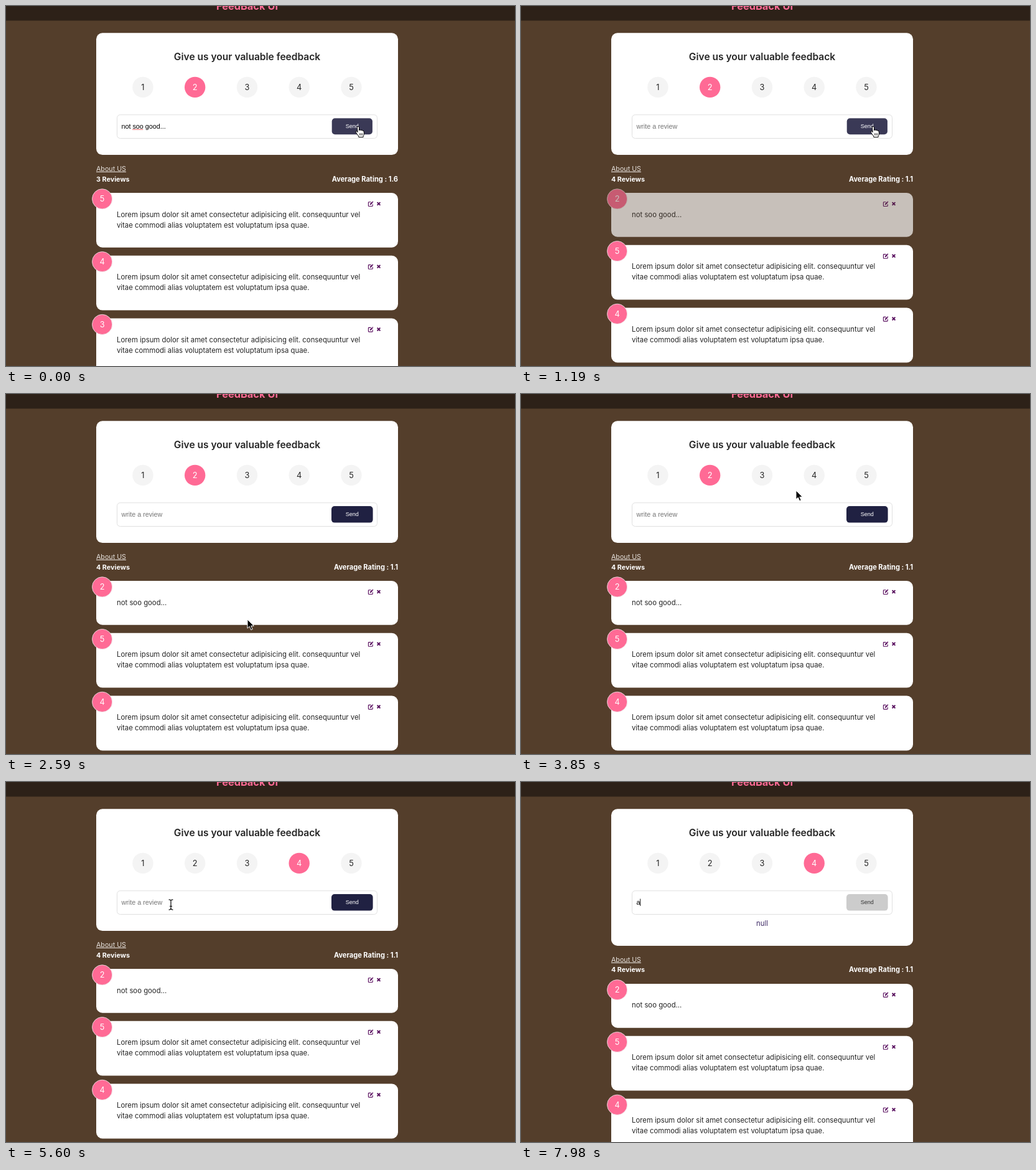
An HTML page for the animation above (8 s loop, 818 by 578 pixels).

```html
<!DOCTYPE html>
<html lang="en">
<head>
<meta charset="utf-8">
<title>Feedback</title>
<style>
  html, body { margin: 0; width: 100%; height: 100%; overflow: hidden; background: #543e2b; }
  svg { display: block; width: 818px; height: 578px; }
  text { font-family: Inter, "Open Sans", sans-serif; white-space: pre; }
  .field { font-family: "Liberation Sans", Arial, sans-serif; }
</style>
</head>
<body>
<svg id="stage" viewBox="0 0 818 578"></svg>
<script>
const stage = document.getElementById('stage');
const LOOP = 8000, STEP = 70;
const PINK = '#ff6a95', INK = '#262626', PURPLE = '#560a5c';
const LOREM = ['Lorem ipsum dolor sit amet consectetur adipisicing elit. consequuntur vel',
               'vitae commodi alias voluptatem est voluptatum ipsa quae.'];

// Pointer path: time, x, y of the hot spot
const PATH = [
  [0, 566, 194], [1750, 566, 194], [1890, 552, 222], [2030, 508, 308], [2170, 452, 380],
  [2310, 414, 398], [2450, 394, 378], [2590, 388, 362], [2870, 388, 362], [3080, 394, 338],
  [3360, 418, 258], [3570, 436, 198], [3710, 443, 172], [3850, 442, 155], [3990, 421, 148],
  [4130, 434, 141], [4270, 459, 133], [4410, 470, 128], [4970, 470, 128], [5110, 446, 148],
  [5320, 350, 180], [5460, 288, 194], [5600, 265, 197], [LOOP, 265, 197]
];

function pointerAt(t) {
  const i = PATH.findIndex(p => p[0] > t);
  const [t0, x0, y0] = PATH[i - 1], [t1, x1, y1] = PATH[i];
  const u = (t - t0) / (t1 - t0);
  return [x0 + (x1 - x0) * u, y0 + (y1 - y0) * u];
}

const text = (x, y, str, size, fill, extra = '') =>
  `<text x="${x}" y="${y}" font-size="${size}" fill="${fill}" ${extra}>${str}</text>`;
const box = (x, y, w, h, r, fill, extra = '') =>
  `<rect x="${x}" y="${y}" width="${w}" height="${h}" rx="${r}" fill="${fill}" ${extra}/>`;
const MID = 'text-anchor="middle" ', END = 'text-anchor="end" ', BOLD = 'font-weight="700"';

const disc = (x, y, n, on, ring = '') =>
  `<circle cx="${x}" cy="${y}" r="${ring ? 16.1 : 16.7}" fill="${on ? PINK : '#f4f4f4'}" ${ring}/>` +
  text(x, y + 4.6, n, 12.8, on ? '#fff' : INK, MID);

const icons = `<g fill="none" stroke="${PURPLE}">
  <path d="M441.5 14.8h-3.3q-.8 0-.8.8v5.1q0 .8.8.8h5.2q.8 0 .8-.8v-2.5" stroke-width="1.1"/>
  <path d="M440.2 18.9l3.7-3.9" stroke-width="2"/><path d="M444.2 14.6l.6-.6" stroke-width="1.9"/>
  <path d="M451.6 15.1l4.8 4.8m0-4.8l-4.8 4.8" stroke-width="1.8"/></g>`;

function card(y, n, lines, alpha = 1) {
  const body = lines.map((s, i) => text(33, 38.6 + 17 * i, s, 11.33, INK)).join('');
  return `<g transform="translate(145 ${y})" opacity="${alpha}">` +
    box(0, 0, 485, 53.8 + 17 * lines.length, 10, '#fff') + icons + body +
    disc(9.6, 9.8, n, true, 'stroke="#eee" stroke-width=".8"') + '</g>';
}

const BEAM = 'M-3.4-8.2q3.4 0 3.4 2.2V6q0 2.2-3.4 2.2M3.4-8.2Q0-8.2 0-6M0 6q0 2.2 3.4 2.2M-2 2.5h4';
const POINTERS = {
  arrow: '<path d="M0 0v14.2l3.3-3 2.4 5.5 2.5-1.1-2.4-5.3h4.5z" fill="#000" stroke="#fff"/>',
  hand: `<path d="M-1.6 1.2q0-1.8 1.5-1.8t1.6 1.8v4.6q.3-1 1.5-1t1.5 1.2q.3-.8 1.4-.8t1.4 1.4q2-.7 2 1.4v3.4q0 2-1.2 3.4v1.8h-7.3v-1.6q-2-2-3.4-4.6-2-2.6-1.2-3.3 1.3-1 3 1.5z" fill="#fff" stroke="#000"/>
    <path d="M2.3 10.2v3.6m2.2-3.6v3.6m2.2-3.6v3.6" stroke="#000" stroke-width=".8"/>`,
  beam: `<path d="${BEAM}" fill="none" stroke="#fff" stroke-width="2.4"/>
    <path d="${BEAM}" fill="none" stroke="#000" stroke-width="1.2"/>`
};

function scene(t) {
  const within = (a, b) => t >= a && t < b;
  const [px, py] = pointerAt(t);
  const inBox = (x0, y0, x1, y1) => px > x0 && px < x1 && py > y0 && py < y1;
  const overSend = inBox(523, 180, 590, 207);
  const overField = inBox(178, 174, 597, 213);
  const sent = t >= 910, warned = t >= 7070;
  const shift = warned ? 23.9 : 0;

  // Header and form
  let out = box(0, 0, 818, 23.5, 0, '#2d2118') +
    text(387.5, 6.3, 'FeedBack UI', 16.4, PINK, MID + BOLD) +
    box(145, 43.3, 485, 195.8 + shift, 10, '#fff') +
    text(387.5, 87.2, 'Give us your valuable feedback', 15.55, INK, MID + 'font-weight="600"');

  const chosen = t < 4620 ? 2 : 4;
  let overDisc = false;
  for (let n = 1; n <= 5; n++) {
    const x = 136.2 + 83.75 * n, hover = Math.hypot(px - x, py - 130.4) < 16.5;
    overDisc = overDisc || hover;
    out += disc(x, 130.4, n, n === chosen || hover);
  }

  // Text field
  out += box(178.5, 174.7, 418, 37.8, 5, '#fff', 'stroke="#e0e0e0"');
  const typed = !sent ? 'not soo good...' : within(7070, 7630) || t >= 7980 ? 'a' : '';
  out += text(185.5, 196.8, typed || 'write a review', 10.75, typed ? '#000' : '#757575', 'class="field"');
  if (!sent) out += '<path d="M203.5 198.3h16.5" stroke="#e33" stroke-width="1.3" stroke-dasharray="1.3 .9"/>';
  const caret = within(350, 910) ? 255.2 : within(6230, 6790) || within(7630, 7980) ? 186 : warned ? 191.3 : 0;
  if (caret) out += box(caret, 187.5, 0.9, 11.5, 0, '#000');

  // Send button
  const fill = warned ? (t < 7140 ? '#8a8a99' : '#ccc') : overSend ? '#3a3956' : '#202142';
  const trim = overSend ? 0.7 : 0;
  out += box(523 + trim, 180 + trim / 2, 66.6 - 2 * trim, 26.6 - trim, 5, fill) +
    text(556.2, 196.2, 'Send', 9, warned ? '#333' : '#fff', MID + 'class="field"');
  if (warned) {
    const note = within(7630, 7980) ? 'Text must be at least 10 characters' : 'null';
    out += text(387.5, 231, note, 11.33, '#3f2a66', MID);
  }

  // Summary and review list
  out += `<g transform="translate(0 ${shift})">` +
    text(145, 264.8, 'About US', 10.7, '#e6e1dc', 'text-decoration="underline"') +
    text(145, 281.6, (sent ? 4 : 3) + ' Reviews', 10.8, '#fff', BOLD) +
    text(630, 281.6, 'Average Rating : ' + (sent ? '1.1' : '1.6'), 11.05, '#fff', END + BOLD);
  if (sent) {
    const u = Math.min(1, (t - 873) / 412);
    out += card(300, 2, ['not soo good...'], u ** 1.5);
  }
  [5, 4, 3].forEach((n, i) => out += card((sent ? 383.8 : 300) + 100.8 * i, n, LOREM));
  out += '</g>';

  // The pointer hides while typing
  if (!warned) {
    const kind = overSend || overDisc ? 'hand' : overField ? 'beam' : 'arrow';
    out += `<g transform="translate(${px} ${py})">${POINTERS[kind]}</g>`;
  }
  return out;
}

let shown = -1;
function tick() {
  const t = Math.floor(performance.now() % LOOP / STEP) * STEP;
  if (t !== shown) stage.innerHTML = scene(shown = t);
  requestAnimationFrame(tick);
}
tick();
</script>
</body>
</html>
```
